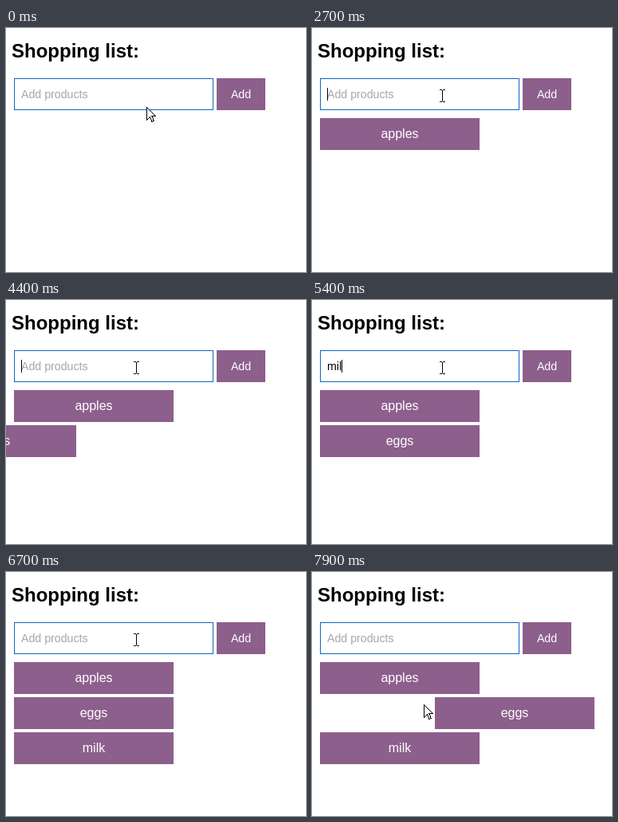
An HTML page for the animation above (8 s loop, 376x306 px).

```html
<!DOCTYPE html>
<html lang="en">
<head>
<meta charset="utf-8">
<title>Shopping list</title>
<style>
  html, body { margin: 0; width: 100%; height: 100%; overflow: hidden; background: #fff; }
  svg { display: block; font: 14.2px "Liberation Sans", Arial, sans-serif; }
  text { white-space: pre; }
  .title { font-size: 24px; font-weight: bold; }
  .field { fill: #fff; stroke: #1068bf; }
  .hint { fill: #a6a6a6; }
  .plum { fill: #8d5f8c; }
  .label { fill: #fff; text-anchor: middle; }
  .item .label { font-size: 16px; }
  .crisp { shape-rendering: crispEdges; }
</style>
</head>
<body>
<svg width="376" height="306" viewBox="0 0 376 306">
  <text class="title" x="7" y="37">Shopping list:</text>
  <rect class="field" x="10.5" y="63.5" width="249" height="39"/>
  <text class="hint" id="hint" x="19" y="88">Add products</text>
  <text id="value" x="19" y="88"></text>
  <rect id="caret" y="75" width="1" height="16"/>
  <rect class="plum" x="264" y="63" width="61" height="40"/>
  <text class="label" x="294.5" y="88">Add</text>
  <g id="list"></g>
  <path id="beam" class="crisp" d="M0 0h3v1h-3zM4 0h3v1h-3zM3 1h1v14h-1zM0 15h3v1h-3zM4 15h3v1h-3z"/>
  <path id="arrow" class="crisp" fill="#fff" stroke="#000"
        d="M.5 .5V16.5L4.5 12.8L7 18.5L9.3 17.5L7 11.8H11.5Z"/>
</svg>
<script>
const LOOP = 8000, TICK = 100, SLIDE = 255, WIDTH = 200;

// keys: when each letter is typed; enter / leave: when the item starts to slide
const words = [
  { text: 'apples', keys: [1100, 1200, 1400, 1600, 1700, 1900], enter: 2401 },
  { text: 'eggs', keys: [3100, 3400, 3600, 3800], enter: 4301, leave: 7716 },
  { text: 'milk', keys: [4900, 5100, 5400, 5500], enter: 5944 }
];
const blinks = [300, 800, 1100, 2400, 2500, 4300, 4400, 5900, 6000, 6700, 7200, 7600];
const pointer = [
  [0, 'arrow', 176, 99], [100, 'beam', 161, 79], [300, 'beam', 161, 78], [400, 'beam', 160, 77],
  [6900, 'beam', 159, 83], [7000, 'arrow', 157, 108], [7100, 'arrow', 150, 136],
  [7200, 'arrow', 143, 157], [7300, 'arrow', 140, 166]
];

const $ = id => document.getElementById(id);
const show = (el, on) => el.setAttribute('visibility', on ? 'visible' : 'hidden');
const move = (el, x, y) => el.setAttribute('transform', `translate(${x} ${y})`);
const passed = (times, t) => times.filter(k => k <= t).length;
const progress = (t, start) => Math.min(1, Math.max(0, (t - start) / SLIDE));

$('list').innerHTML = words.map(w =>
  `<g class="item"><rect class="plum" width="${WIDTH}" height="40"/>` +
  `<text class="label" x="${WIDTH / 2}" y="25">${w.text}</text></g>`).join('');
const items = [...$('list').children];

function render(t) {
  let typed = '';
  words.forEach((w, i) => {
    if (t < w.enter) typed += w.text.slice(0, passed(w.keys, t));
    const out = w.leave ? progress(t, w.leave) : 0;
    const shift = progress(t, w.enter) - 1 + out;
    show(items[i], t >= w.enter && out < 1);
    move(items[i], 10 + Math.round(WIDTH * shift), 113 + 44 * i);
  });

  const value = $('value');
  value.textContent = typed;
  show($('hint'), !typed);
  const end = typed ? Math.round(value.getComputedTextLength()) : 0;
  $('caret').setAttribute('x', 19 + end);
  show($('caret'), passed(blinks, t) % 2);

  const [, shape, x, y] = pointer[passed(pointer.map(p => p[0]), t) - 1];
  for (const id of ['beam', 'arrow']) show($(id), id === shape);
  move($(shape), x, y);
}

const start = performance.now();
function frame() {
  const t = (performance.now() - start) % LOOP;
  render(Math.floor(t / TICK) * TICK);
  requestAnimationFrame(frame);
}
frame();
</script>
</body>
</html>
```
